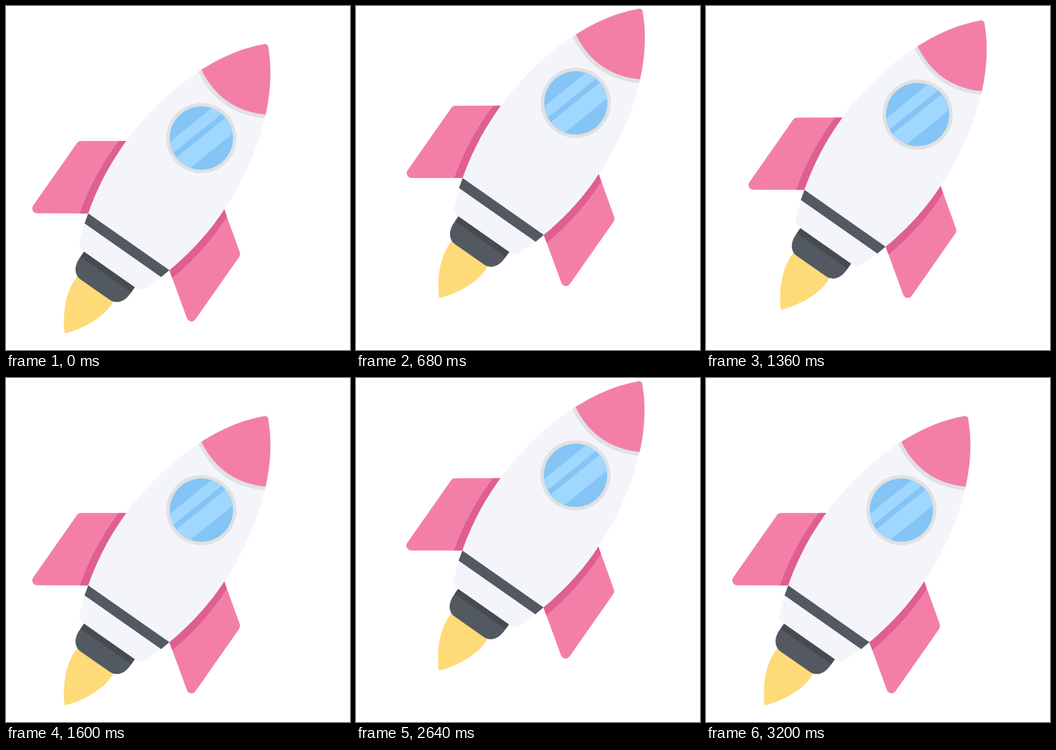
These frames come from a looping animation (500 px wide and 500 px high, 3.24 s). An HTML page:

```html
<!DOCTYPE html>
<html lang="en">
<head>
<meta charset="utf-8">
<title>Rocket</title>
<style>
  html, body { margin: 0; width: 100%; height: 100%; overflow: hidden; background: #fff; }
  svg { display: block; width: 100vw; height: 100vh; }
</style>
</head>
<body>
<svg viewBox="0 0 500 500">
  <defs>
    <path id="hull" d="M0-166 Q3-166 6-161.500 C58-109 87.500-14 87 78 C87 118 80 156 72 184
      L68 199 L57 228.500 Q53 233.500 45.500 233 L-45.500 233 Q-53 233.500 -57 228.500 L-68 199 L-72 184
      C-80 156 -87 118 -87 78 C-87.500-14 -58-109 -6-161.500 Q-3-166 0-166Z"/>
    <clipPath id="hullClip"><use href="#hull"/></clipPath>
    <clipPath id="glassClip"><circle r="46"/></clipPath>
    <g id="fin">
      <path fill="#f37fa9" d="M80 61 L87 66 L141 104 Q144 106 144 110 L144 220 Q144 224.500 141 226.500
        Q137 229 133 226.500 L72 184Z"/>
      <path fill="#df5f8f" d="M80 61 L96 72.500 Q98 133 82 191 L72 184Z"/>
    </g>
  </defs>
  <g id="rocket">
    <g transform="rotate(35)">
      <path fill="#ffda78" d="M-32 264 C-36 290 -22.500 320 -1.500 345 Q0 347 1.500 345 C22 320 35 290 31 264Z"/>
      <use href="#fin"/>
      <use href="#fin" transform="scale(-1 1)"/>
      <path fill="#525961" d="M-45 232.500 H45 L45 244 C45 261 35.500 269 26 269 H-26 C-35.500 269 -45 261 -45 244Z"/>
      <path fill="#464b4f" d="M-45 232.500 H45 V242 H-45Z"/>
      <use href="#hull" fill="#f4f5fa"/>
      <g clip-path="url(#hullClip)">
        <path fill="#e1e1e2" d="M-60-77 Q0-42 60-77 V-180 H-60Z"/>
        <path fill="#f37fa9" d="M-58-82 Q0-49 58-82 L60-180 H-60Z"/>
        <path fill="#525961" d="M-90 184 H90 V199 H-90Z"/>
      </g>
    </g>
    <circle r="51" fill="#e1e1e2"/>
    <circle r="46" fill="#84c5f6"/>
    <g clip-path="url(#glassClip)">
      <path transform="rotate(-39)" fill="#a0d7ff" d="M-50-24.500 H50 V-9 H-50Z M-50-1 H50 V23.500 H-50Z"/>
    </g>
  </g>
</svg>
<script>
  const LOOP = 3240, CYCLE = 1600, STEP = 40;
  const HOME = { x: 284, y: 192 }, TRAVEL = { x: 36, y: -52 };
  const rocket = document.getElementById('rocket');

  // Cubic Bézier easing (.25, .1, .25, 1), solved by bisection.
  function ease(p) {
    let low = 0, high = 1;
    for (let i = 0; i < 24; i++) {
      const s = (low + high) / 2;
      if (0.75 * s * (1 - s) + s ** 3 < p) low = s; else high = s;
    }
    const s = (low + high) / 2;
    return 0.3 * s * (1 - s) ** 2 + 3 * s * s * (1 - s) + s ** 3;
  }

  function lift(time) {
    const phase = (time % CYCLE) / (CYCLE / 2);
    return phase < 1 ? ease(phase) : 1 - (phase - 1) ** 3;
  }

  function draw(now) {
    const time = Math.floor((now % LOOP) / STEP) * STEP;
    const k = lift(time);
    rocket.setAttribute('transform', `translate(${HOME.x + TRAVEL.x * k} ${HOME.y + TRAVEL.y * k})`);
  }

  let start;
  function tick(now) {
    start ??= now;
    draw(now - start);
    requestAnimationFrame(tick);
  }
  draw(0);
  requestAnimationFrame(tick);
</script>
</body>
</html>
```
